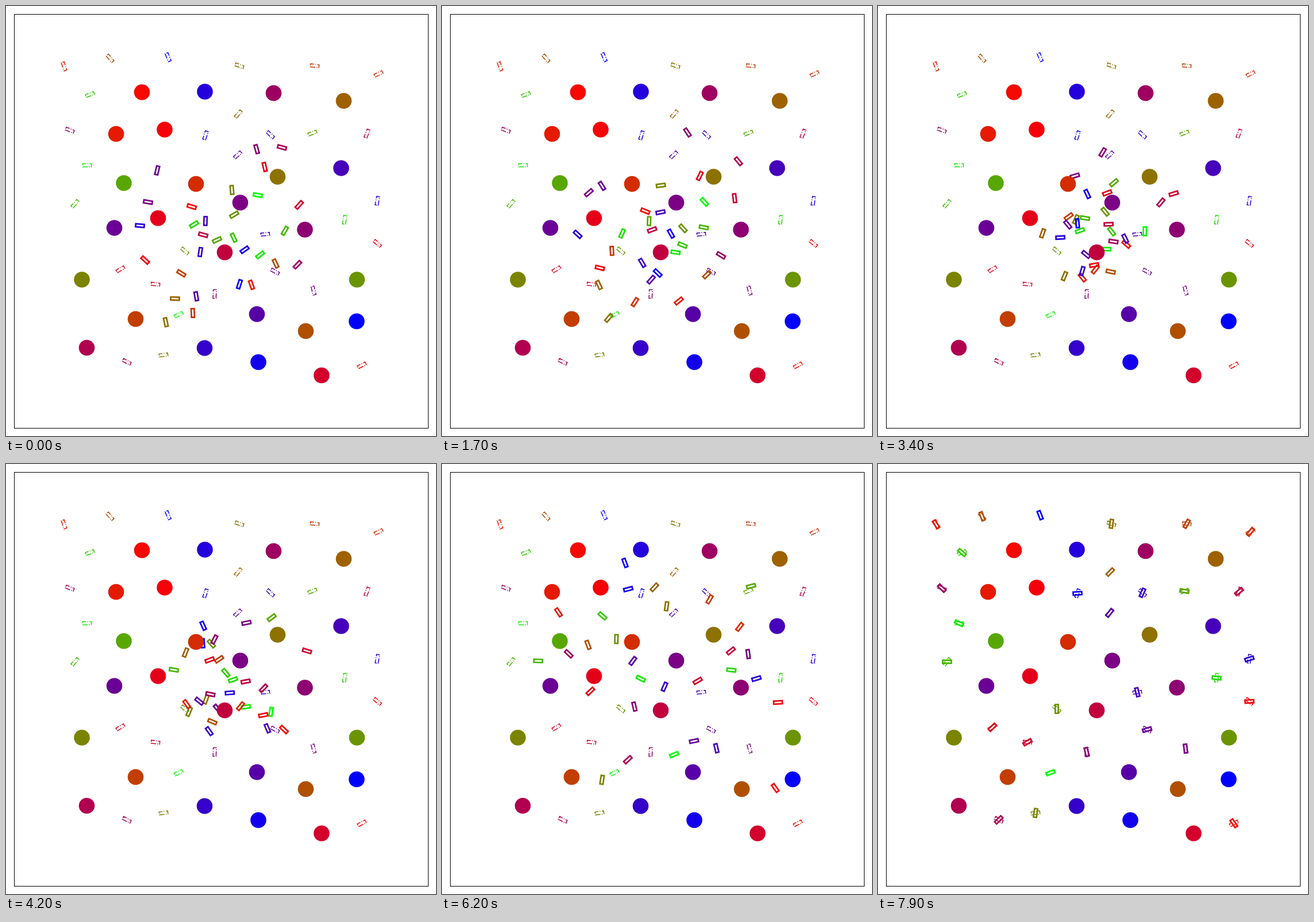
These frames come from a looping animation (748 px wide and 748 px high, 8000 ms). An HTML page:

```html
<!DOCTYPE html>
<html lang="en">
<head>
<meta charset="utf-8">
<title>Cars among discs</title>
<style>
  html, body { margin: 0; height: 100%; overflow: hidden; background: #fff; }
  svg { display: block; width: 100vw; height: 100vh; }
  path { fill: none; }
  #goals path { stroke-width: 1.5; stroke-dasharray: 8.9 2.2 1.4 2.2; }
  #cars path { stroke-width: 2.7; }
</style>
</head>
<body>
<svg viewBox="0 0 748 748">
  <rect x="14.5" y="14.5" width="720" height="720" fill="none" stroke="#000"/>
  <g id="goals"></g>
  <g id="cars"></g>
  <g id="discs"></g>
</svg>
<script>
const LOOP = 8000, TICK = 100;
const STOPS = [0, 25, 53, 78];
const TURN_STEPS = 16;
const BODY = 'M-7.5 2.65H7.5V-2.65H-7.5Z';
const cars = [];

function add(parent, tag, attrs) {
  const el = document.createElementNS('http://www.w3.org/2000/svg', tag);
  for (const k in attrs) el.setAttribute(k, attrs[k]);
  return document.getElementById(parent).appendChild(el);
}

// Green to red to blue over 30 steps.
function hue(i) {
  const k = i / 14.5, c = v => Math.round(255 * Math.max(0, v));
  return `rgb(${c(1 - Math.abs(1 - k))},${c(1 - k)},${c(k - 1)})`;
}

const place = (x, y, a) => `translate(${x} ${y}) rotate(${a})`;

// Each car has a start pose, two points on its way and a goal pose.
function car(start, via1, via2, goal) {
  const stroke = hue(cars.length);
  add('goals', 'path', { d: BODY, stroke, transform: place(...goal) });
  const el = add('cars', 'path', { d: BODY, stroke });
  cars.push({ el, pts: [start, via1, via2, goal], angle: start[2] });
}

car([438, 329, 10], [464, 361], [439, 484], [300, 537, -25]);
car([442, 433, -38], [388, 424], [409, 406], [141, 277, 0]);
car([327, 380, -30], [321, 400], [463, 358], [589, 372, -82]);
car([396, 403, 65], [421, 412], [330, 309], [146, 154, -20]);
car([485, 391, -60], [415, 378], [202, 345], [120, 344, -48]);
car([367, 407, -25], [373, 342], [525, 221], [533, 221, -20]);
car([397, 363, -30], [420, 388], [311, 276], [311, 426, 42]);
car([393, 320, 85], [365, 328], [287, 514], [274, 607, -7]);
car([278, 550, 78], [305, 516], [379, 312], [406, 104, 20]);
car([294, 509, 2], [270, 449], [351, 242], [404, 188, -48]);
car([469, 448, 65], [440, 470], [291, 393], [181, 91, 50]);
car([305, 465, 32], [304, 392], [431, 287], [537, 104, 7]);
car([325, 534, 87], [354, 489], [466, 349], [648, 118, -25]);
car([427, 485, 70], [388, 509], [248, 324], [101, 105, 72]);
car([323, 349, 17], [389, 378], [552, 530], [619, 625, -27]);
car([242, 442, 42], [318, 459], [544, 419], [646, 413, 42]);
car([450, 280, 77], [432, 311], [290, 370], [199, 458, -30]);
car([510, 346, -48], [508, 329], [504, 342], [260, 484, 7]);
car([343, 398, 15], [386, 382], [456, 360], [628, 222, -68]);
car([480, 246, 15], [520, 302], [373, 466], [210, 619, 28]);
car([507, 450, -45], [453, 419], [272, 371], [111, 216, 22]);
car([436, 249, 74], [413, 221], [333, 382], [363, 501, -88]);
car([247, 341, 10], [285, 312], [511, 281], [535, 495, 76]);
car([263, 286, -77], [300, 343], [418, 476], [468, 462, 30]);
car([331, 505, 80], [376, 451], [315, 376], [403, 259, -42]);
car([347, 374, -88], [407, 366], [479, 512], [451, 397, -5]);
car([338, 428, -82], [355, 456], [363, 441], [460, 224, 45]);
car([233, 382, 5], [263, 404], [494, 386], [646, 339, -80]);
car([415, 424, -35], [382, 365], [322, 228], [347, 225, -72]);
car([406, 484, -72], [355, 430], [332, 218], [282, 89, 68]);

[
  [205, 308], [610.5, 476], [132, 476], [472.5, 297], [587.5, 165],
  [521.5, 565.5], [225.5, 544.5], [330.5, 309.5], [191.5, 222.5], [236.5, 150],
  [276, 215], [264.5, 369], [549, 642.5], [380.5, 428.5], [140.5, 594.5],
  [465.5, 151.5], [520, 389], [407.5, 342], [188.5, 386], [436.5, 536],
  [583, 282], [345.5, 595], [346, 149], [439, 619.5], [610, 548.5]
].forEach(([cx, cy], i) => add('discs', 'circle', { cx, cy, r: 13.8, fill: hue(i + 5) }));

// Shortest turn for a shape that looks the same after half a turn.
const turn = (a, b) => ((b - a + 90) % 180 + 180) % 180 - 90;

// Speed along one axis at a stop; every car starts from rest.
function speed(pts, j, k) {
  if (!j) return 0;
  const next = Math.min(j + 1, STOPS.length - 1);
  return (pts[next][k] - pts[j - 1][k]) / (STOPS[next] - STOPS[j - 1]);
}

// Smooth curve through the points of a car at step n.
function position(pts, n) {
  let j = 0;
  while (j < STOPS.length - 2 && n >= STOPS[j + 1]) j++;
  const span = STOPS[j + 1] - STOPS[j], u = (n - STOPS[j]) / span, r = 1 - u;
  return [0, 1].map(k =>
    pts[j][k] * r * r * (1 + 2 * u) + pts[j + 1][k] * u * u * (3 - 2 * u) +
    u * r * span * (speed(pts, j, k) * r - speed(pts, j + 1, k) * u));
}

function draw(ms) {
  const n = Math.max(0, Math.floor(ms / TICK) - 1);
  const steer = Math.min(1, n / TURN_STEPS);
  for (const { el, pts, angle } of cars) {
    const [x, y] = position(pts, n), [px, py] = position(pts, Math.max(0, n - 0.5));
    const heading = Math.atan2(y - py, x - px) * 180 / Math.PI;
    el.setAttribute('transform', place(x, y, angle + turn(angle, heading) * steer));
  }
}

const start = performance.now();
function tick() {
  draw((performance.now() - start) % LOOP);
  requestAnimationFrame(tick);
}
tick();
</script>
</body>
</html>
```
